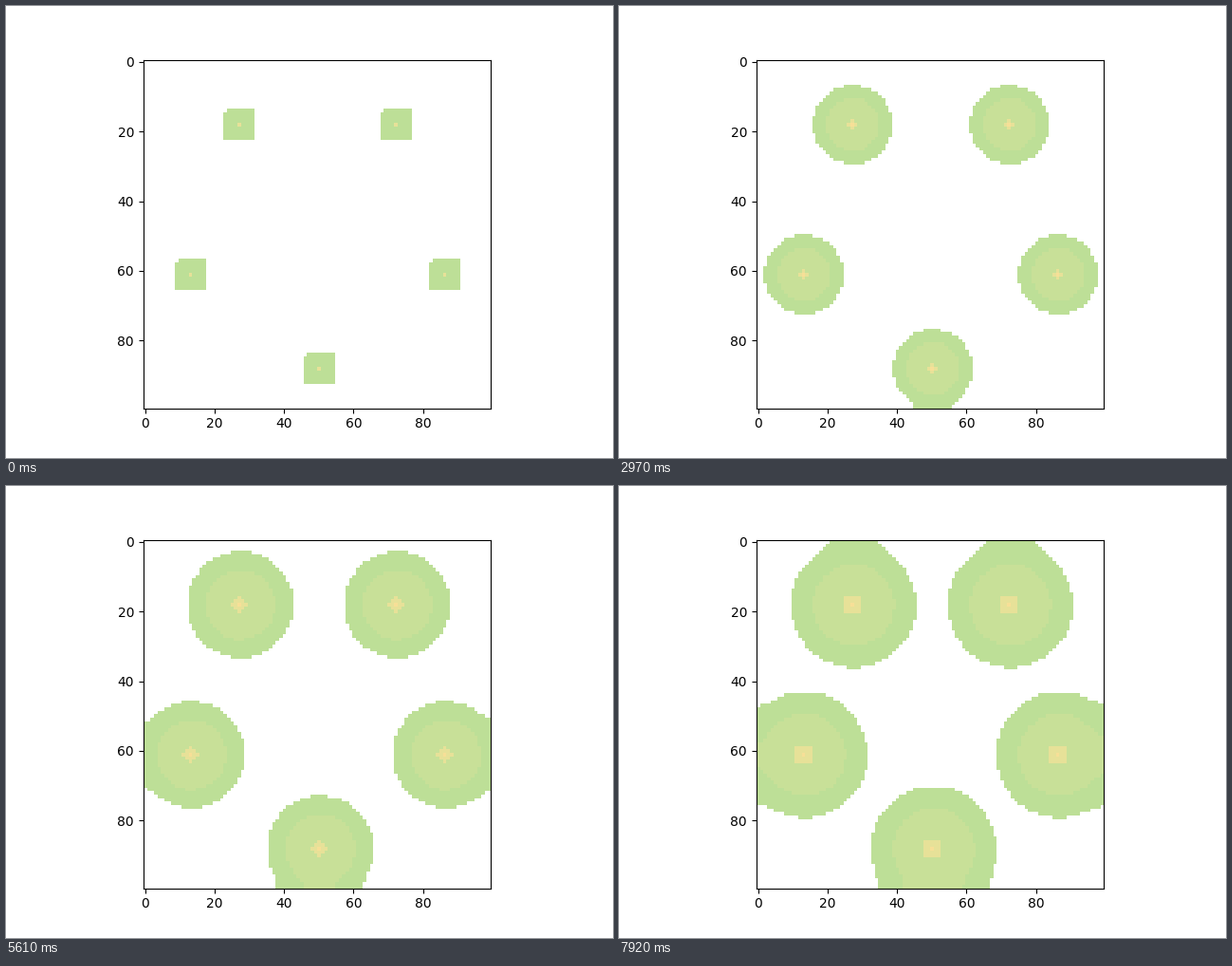
Write a matplotlib script that moves like this. It is 640x476 px and loops after 8000 ms.

```python
import numpy as np
import matplotlib.pyplot as plt
from matplotlib.animation import FuncAnimation

SIZE = 100
SOURCES = [(27, 18), (72, 18), (13, 61), (86, 61), (50, 88)]
INTERVAL, LOOP, STEP = 40, 8000, 330

WHITE = (255, 255, 255)
OUTER = (189, 223, 151)
MIDDLE = (200, 224, 152)
CORE = (231, 225, 152)
HOT = (247, 223, 151)

y, x = np.mgrid[:SIZE, :SIZE]


def wall_bulge(cx, cy, spread):
    """Extra squared radius from reflection at the four walls."""
    last = SIZE - 1
    walls = [(cx, x), (last - cx, last - x), (cy, y), (last - cy, last - y)]
    return sum(2 * spread * np.log1p(np.exp(-2 * reach * gap / spread))
               for reach, gap in walls)


def field(step):
    """Diffusing spots: every squared radius follows from the step number."""
    image = np.full((SIZE, SIZE, 3), WHITE, dtype=np.uint8)
    drift_x, drift_y = 0.01 + 0.018 * step, 0.01 + 0.004 * step
    for cx, cy in SOURCES:
        dx, dy = x - cx, y - cy
        near = dx**2 + dy**2
        spread = (dx - drift_x)**2 + (dy - drift_y)**2
        spread -= wall_bulge(cx, cy, 0.1 + 1.7 * step)

        # Nothing travels further than four cells per step.
        reached = np.maximum(abs(dx), abs(dy)) <= 4 * (step + 1)
        image[reached & (spread <= max(32.1, 25.5 + 13 * step))] = OUTER
        if step > 0:
            image[spread <= 15.5 + 5.3 * step] = MIDDLE
        image[near <= 0.1 + 0.016 * step**2] = CORE
        image[near <= 0.04 * step - 0.1] = HOT
    return image


def step_at(frame):
    return max(0, int((frame + 0.5) * INTERVAL // STEP) - 1)


fields = [field(step) for step in range(LOOP // STEP)]

fig, ax = plt.subplots(figsize=(6.4, 4.76), dpi=100)
picture = ax.imshow(fields[0])


def update(frame):
    picture.set_data(fields[step_at(frame)])
    return [picture]


anim = FuncAnimation(fig, update, frames=LOOP // INTERVAL, interval=INTERVAL,
                     repeat=True, repeat_delay=0)
plt.show()
```
